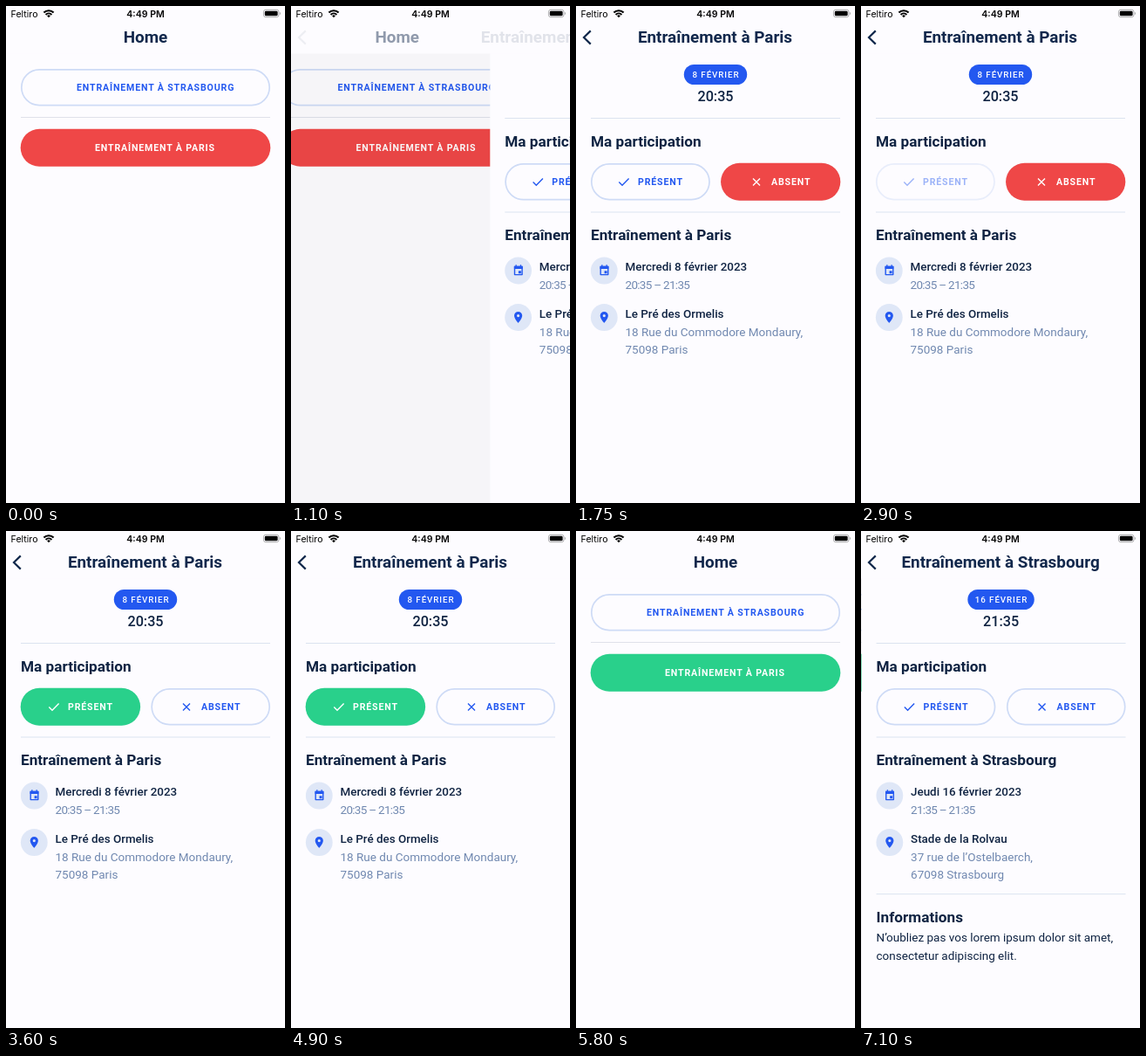
Write an HTML page that moves like this. It is 320 by 569 pixels and loops after 8 s.

```html
<!DOCTYPE html>
<html lang="fr">
<head>
<meta charset="utf-8">
<title>Entraînements</title>
<style>
  html, body { margin: 0; width: 100%; height: 100%; overflow: hidden; background: #fdfcff; }
  svg { display: block; width: 100vw; height: 100vh; font-family: Roboto, sans-serif; }
  .title { font-size: 18.9px; font-weight: 600; fill: #12284c; text-anchor: middle; }
  .section { font-size: 17.2px; font-weight: 600; fill: #0f2342; }
  .strong { font-size: 13.4px; font-weight: 500; fill: #0f2342; }
  .body { font-size: 13.5px; fill: #0f2342; }
  .soft { font-size: 13.5px; fill: #7088b0; }
  .hours { letter-spacing: -.7px; }
  .label { font-size: 10.6px; font-weight: 600; letter-spacing: .85px; }
  .chip { font-size: 9.8px; font-weight: 500; letter-spacing: .9px; fill: #fff; text-anchor: middle; }
  .time { font-size: 16.2px; font-weight: 500; fill: #0f2342; text-anchor: middle; }
  .status { font: 400 10.6px Inter, sans-serif; fill: #000; }
  .clock { font-weight: 600; text-anchor: middle; }
</style>
</head>
<body>
<svg id="stage" viewBox="0 0 320 569" preserveAspectRatio="none"></svg>
<script>
const BG = '#fdfcff', NAVY = '#12284c', BLUE = '#2358f0', RED = '#ef4747', GREEN = '#29d08b';
const LOOP = 8000, STEP = 50;

const text = (x, y, cls, str) => `<text x="${x}" y="${y}" class="${cls}">${str}</text>`;
const rule = (y, color = '#dbe3f0') => `<path d="M17 ${y}H303" stroke="${color}"/>`;

const icons = {
  check: '<path d="M49.3 201.6l3.7 3.7 7.6-7.8"/>',
  cross: '<path d="M203 197.4l8 8m0-8l-8 8"/>'
};

// Pill button: filled when a colour is given, outlined otherwise
function pill(x, y, w, label, labelX, fill, icon) {
  const ink = fill ? '#fff' : BLUE;
  const box = fill
    ? `<rect x="${x - .3}" y="${y - .2}" width="${w + .6}" height="42.9" rx="21.4" fill="${fill}"/>`
    : `<rect x="${x + .8}" y="${y + .8}" width="${w - 1.6}" height="40.9" rx="20.4" fill="${BG}" stroke="#cedbf6" stroke-width="1.7"/>`;
  const mark = icon ? `<g fill="none" stroke="${ink}" stroke-width="1.4">${icons[icon]}</g>` : '';
  return box + mark + `<text x="${labelX}" y="${y + 25.2}" class="label" fill="${ink}">${label}</text>`;
}

const present = fill => pill(17, 180, 136.8, 'PRÉSENT', 71, fill, 'check');
const absent = fill => pill(166.4, 180, 136.6, 'ABSENT', 224, fill, 'cross');

const calendar = `<circle cx="32.3" cy="303" r="15.4" fill="#dfe7f7"/>
  <path d="M28.2 298.4h8.6v9.2h-8.6z" fill="none" stroke="${BLUE}" stroke-width="1.4" stroke-linejoin="round"/>
  <path d="M27.6 297.8h9.8v3.2h-9.8zM29.2 296.3h1.3v2h-1.3zM34.5 296.3h1.3v2h-1.3zM32.6 303.2h3v3h-3z" fill="${BLUE}"/>`;
const pin = `<circle cx="32.3" cy="356.5" r="15.4" fill="#dfe7f7"/>
  <path fill-rule="evenodd" fill="${BLUE}" d="M32.3 350a4.6 4.6 0 0 0-4.6 4.6c0 3.4 4.6 8.4 4.6 8.4s4.6-5 4.6-8.4a4.6 4.6 0 0 0-4.6-4.6zm0 3a1.6 1.6 0 1 1 0 3.2a1.6 1.6 0 0 1 0-3.2z"/>`;

function detail(d, buttons) {
  const w = d.chipWidth;
  return `<rect y="54" width="322" height="515" fill="${BG}"/>
    <rect x="${160 - w / 2}" y="67" width="${w}" height="23" rx="11.5" fill="${BLUE}"/>`
    + text(160.5, 82.3, 'chip', d.chip) + text(160, 108.6, 'time', d.start)
    + rule(128.5) + text(17, 161, 'section', 'Ma participation')
    + buttons + rule(236)
    + text(17, 268.3, 'section', d.name) + calendar + pin
    + text(56.5, 303, 'strong', d.date) + text(56.5, 323.6, 'soft hours', d.start + ' – 21:35')
    + text(56.5, 357, 'strong', d.place)
    + text(56.5, 377.5, 'soft', d.street) + text(56.5, 397.8, 'soft', d.city)
    + (d.notes ? rule(415.7) + text(17, 447.8, 'section', 'Informations')
      + d.notes.map((line, i) => text(17, 470 + i * 20.6, 'body', line)).join('') : '');
}

const paris = {
  name: 'Entraînement à Paris', chip: '8 FÉVRIER', chipWidth: 72.4, start: '20:35',
  date: 'Mercredi 8 février 2023', place: 'Le Pré des Ormelis',
  street: '18 Rue du Commodore Mondaury,', city: '75098 Paris'
};
const strasbourg = {
  name: 'Entraînement à Strasbourg', chip: '16 FÉVRIER', chipWidth: 76.4, start: '21:35',
  date: 'Jeudi 16 février 2023', place: 'Stade de la Rolvau',
  street: '37 rue de l’Ostelbaerch,', city: '67098 Strasbourg',
  notes: ['N’oubliez pas vos lorem ipsum dolor sit amet,', 'consectetur adipiscing elit.']
};

const parisButton = fill => pill(17, 141, 286, 'ENTRAÎNEMENT À PARIS', 102, fill);
const parisButtons = `<g id="present">${present()}<g id="presentOn">${present(GREEN)}</g></g>
  ${absent()}<g id="absentOn">${absent(RED)}</g>`;

document.getElementById('stage').innerHTML = `
  <rect width="320" height="569" fill="${BG}"/>
  <g id="home">
    <g id="strasButton">${pill(17, 72, 286, 'ENTRAÎNEMENT À STRASBOURG', 81)}</g>
    ${rule(127.5, '#dfe1ea')}
    <g id="redButton">${parisButton(RED)}</g>
    <g id="greenButton">${parisButton(GREEN)}</g>
  </g>
  <rect id="shade" width="320" height="569"/>
  <g id="parisPage">${detail(paris, parisButtons)}</g>
  <g id="strasPage">${detail(strasbourg, present() + absent())}</g>
  <rect width="320" height="54.5" fill="${BG}"/>
  <g id="homeTitle">${text(160, 41.5, 'title', 'Home')}</g>
  <g id="parisTitle">${text(159.5, 41.5, 'title', paris.name)}</g>
  <g id="strasTitle">${text(159.5, 41.5, 'title', strasbourg.name)}</g>
  <path id="back" d="M16.8 28.4L9 36l7.8 7.6" fill="none" stroke="${NAVY}" stroke-width="2.2"/>
  ${text(5.6, 12.6, 'status', 'Feltiro')}
  <g fill="none" stroke="#000" stroke-width="2.1">
    <path d="M43.4 7.6a8 8 0 0 1 11.2 0M45.6 9.9a4.9 4.9 0 0 1 6.8 0"/>
  </g>
  <path d="M49 13.2l-1.9-2a2.7 2.7 0 0 1 3.8 0z"/>
  ${text(160, 12.6, 'status clock', '4:49 PM')}
  <rect x="295.4" y="4.3" width="17.6" height="8.4" rx="2.5" fill="none" stroke="#a5a5a8" stroke-width=".9"/>
  <rect x="296.8" y="5.7" width="14.8" height="5.6" rx="1.4"/>
  <path d="M314.2 7a1.7 1.7 0 0 1 0 3z" fill="#a5a5a8"/>`;

const el = {};
document.querySelectorAll('#stage [id]').forEach(n => el[n.id] = n);

const span = (t, a, b) => Math.min(1, Math.max(0, (t - a) / (b - a)));
const settle = x => (1 - Math.exp(-3.9 * x)) / (1 - Math.exp(-3.9));
const tap = (t, a, b) => 1 - .6 * Math.sin(Math.PI * Math.pow(span(t, a, b), .7));

function place(node, x, opacity) {
  node.setAttribute('transform', `translate(${x.toFixed(2)} 0)`);
  node.setAttribute('opacity', opacity.toFixed(3));
}
const fade = (node, opacity) => node.setAttribute('opacity', opacity.toFixed(3));

// How far the detail page covers the home page, 0 to 1
function cover(t) {
  if (t >= 7000) return 1 - (1.2 - .65 * span(t, 7000, 7100)) / 320;
  return settle(span(t, 1040, 1750)) - settle(span(t, 5163, 5800));
}

function draw(t) {
  const p = Math.min(1, Math.max(0, cover(t))), rest = 1 - p;
  const second = t >= 5800, answered = span(t, 3350, 3600);
  const page = second ? el.strasPage : el.parisPage;
  const title = second ? el.strasTitle : el.parisTitle;

  place(el.home, -96 * p, 1);
  fade(el.shade, .1 * p);
  fade(el.strasButton, tap(t, 6500, 6800));
  fade(el.redButton, t < 4000 ? tap(t, 450, 800) : 0);
  fade(el.greenButton, t < 4000 ? 0 : 1);

  [el.parisPage, el.strasPage].forEach(n => place(n, 320 * rest, n === page && p > 0 ? 1 : 0));
  fade(el.present, tap(t, 2800, 3000));
  fade(el.presentOn, answered);
  fade(el.absentOn, 1 - answered);

  place(el.homeTitle, -104 * Math.pow(p, .8), Math.pow(rest, 2.3));
  const slide = second ? 320 * rest : 196 * Math.pow(rest, .855);
  [el.parisTitle, el.strasTitle].forEach(n => place(n, slide, n === title ? Math.pow(p, 1.75) : 0));
  fade(el.back, Math.min(1, 1.3 * Math.pow(p, 2.4)));
}

const begin = performance.now();
function tick() {
  const t = (performance.now() - begin) % LOOP;
  draw(Math.floor(t / STEP) * STEP);
  requestAnimationFrame(tick);
}
tick();
</script>
</body>
</html>
```
